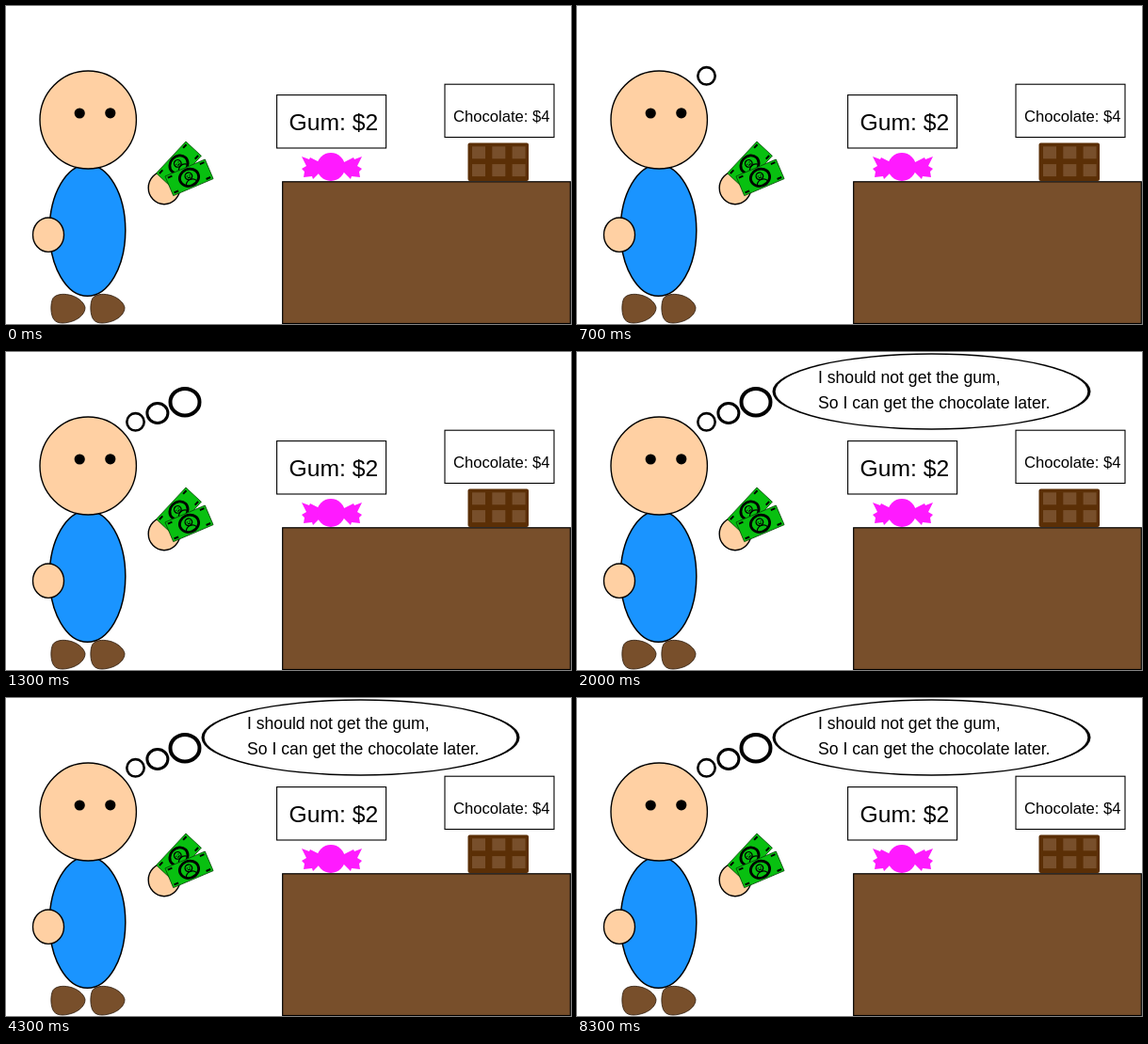
An HTML page that plays this animation: 600 by 338 pixels, repeating every 10000 ms.

```html
<!DOCTYPE html>
<html lang="en">
<head>
<meta charset="utf-8">
<title>Saving up</title>
<style>
  html, body { margin: 0; width: 100%; height: 100%; overflow: hidden; background: #fff; }
  svg { display: block; width: 100vw; height: 100vh; }
  text { font-family: "Liberation Sans", Arial, sans-serif; }
  .skin { fill: #ffd0a3; stroke: #000; stroke-width: 1.4; }
  .sign { fill: #fff; stroke: #000; stroke-width: 1.1; }
  .puff { fill: #fff; stroke: #000; }
  .thought { opacity: 0; }
</style>
</head>
<body>
<svg viewBox="0 0 600 338">
  <defs>
    <g id="bill">
      <rect x="-23" y="-11.2" width="46" height="22.4" fill="#08c010" stroke="#064d08" stroke-width=".8"/>
      <path d="M-21-8.6h5M16-8.6h5M-21 8.6h5M16 8.6h5" stroke="#000" stroke-width="2"/>
      <ellipse rx="10.3" ry="9" fill="none" stroke="#000" stroke-width="2.8"/>
      <circle cy="-1.6" r="3.8" fill="none" stroke="#000" stroke-width="1.3"/>
      <path d="M-6 6Q-4 2.4 0 2.4T6 6M-1.5-2.6v1M1.5-2.6v1M-1.5 0h3" fill="none" stroke="#000" stroke-width="1.2"/>
    </g>
    <path id="shoe" d="M2 4C5 0 12-1 19 .5C27 2 35 8 36 14C36 20 31 25 24 28C16 31 7 32 3 27C-1 22-1 9 2 4Z"
          fill="#784f2b" stroke="#2b1a0b" stroke-width=".8"/>
    <path id="wing" d="M-12-5L-22-10L-23-8L-31-11L-26-1L-31 2L-28 5L-29 11L-20 10L-19 13L-12 6Z"/>
  </defs>
  <rect width="600" height="338" fill="#fff"/>

  <g id="person">
    <use href="#shoe" x="48" y="306.5"/>
    <use href="#shoe" x="90" y="306.5"/>
    <ellipse cx="86.5" cy="238.5" rx="40.3" ry="69.8" fill="#1a94ff" stroke="#000" stroke-width="1.5"/>
    <ellipse class="skin" cx="87.2" cy="121" rx="51.2" ry="52"/>
    <circle cx="78.2" cy="114" r="5.6"/>
    <circle cx="110.8" cy="113.8" r="5.6"/>
    <ellipse class="skin" cx="45" cy="243.2" rx="16.5" ry="18.2"/>
    <ellipse class="skin" cx="168" cy="193.3" rx="16.8" ry="17.4"/>
    <use href="#bill" transform="translate(183.5 168.5) rotate(-47)"/>
    <use href="#bill" transform="translate(194.5 182.3) rotate(-23)"/>
  </g>

  <g id="shop">
    <rect x="293.7" y="186.8" width="305.6" height="150.7" fill="#784f2b" stroke="#000" stroke-width="1.2"/>
    <rect class="sign" x="287.6" y="94.6" width="116" height="56.4"/>
    <text x="300.5" y="132" font-size="24.7">Gum: $2</text>
    <rect class="sign" x="466" y="83.2" width="116" height="56.3"/>
    <text x="475" y="122.8" font-size="16.6">Chocolate: $4</text>
    <g transform="translate(345 171)" fill="#ff1aff">
      <use href="#wing"/>
      <use href="#wing" transform="matrix(-1 0 0 1 2 0)"/>
      <circle r="15"/>
    </g>
    <rect x="490.5" y="145.5" width="64.5" height="40.5" rx="2" fill="#5b2f06"/>
    <g id="squares" fill="#784f2b"></g>
  </g>

  <circle class="thought puff" data-at="700" cx="137.5" cy="74.3" r="9.2" stroke-width="2.6"/>
  <ellipse class="thought puff" data-at="1000" cx="160.9" cy="65" rx="11" ry="10.4" stroke-width="3"/>
  <ellipse class="thought puff" data-at="1300" cx="190" cy="53.2" rx="15.5" ry="14.3" stroke-width="4"/>
  <g class="thought" data-at="1700">
    <ellipse cx="376.5" cy="42" rx="169" ry="40.7"/>
    <ellipse cx="376.5" cy="42" rx="165.8" ry="39.3" fill="#fff"/>
    <text font-size="17.6"><tspan x="256" y="33">I should not get the gum,</tspan><tspan x="256" y="59.7">So I can get the chocolate later.</tspan></text>
  </g>
</svg>
<script>
  const LOOP = 10000;

  const squares = document.getElementById("squares");
  for (let i = 0; i < 6; i++) {
    const r = document.createElementNS(squares.namespaceURI, "rect");
    const box = { x: 495 + (i % 3) * 21.3, y: 149.3 + Math.floor(i / 3) * 18.8, width: 14, height: 13 };
    for (const k in box) r.setAttribute(k, box[k]);
    squares.append(r);
  }

  // Each part pops in at its own time and stays until the loop restarts.
  for (const el of document.querySelectorAll(".thought")) {
    const offset = el.dataset.at / LOOP;
    const anim = el.animate(
      [{ opacity: 0 }, { opacity: 0, offset }, { opacity: 1, offset }, { opacity: 1 }],
      { duration: LOOP, iterations: Infinity }
    );
    anim.startTime = 0;
  }
</script>
</body>
</html>
```
